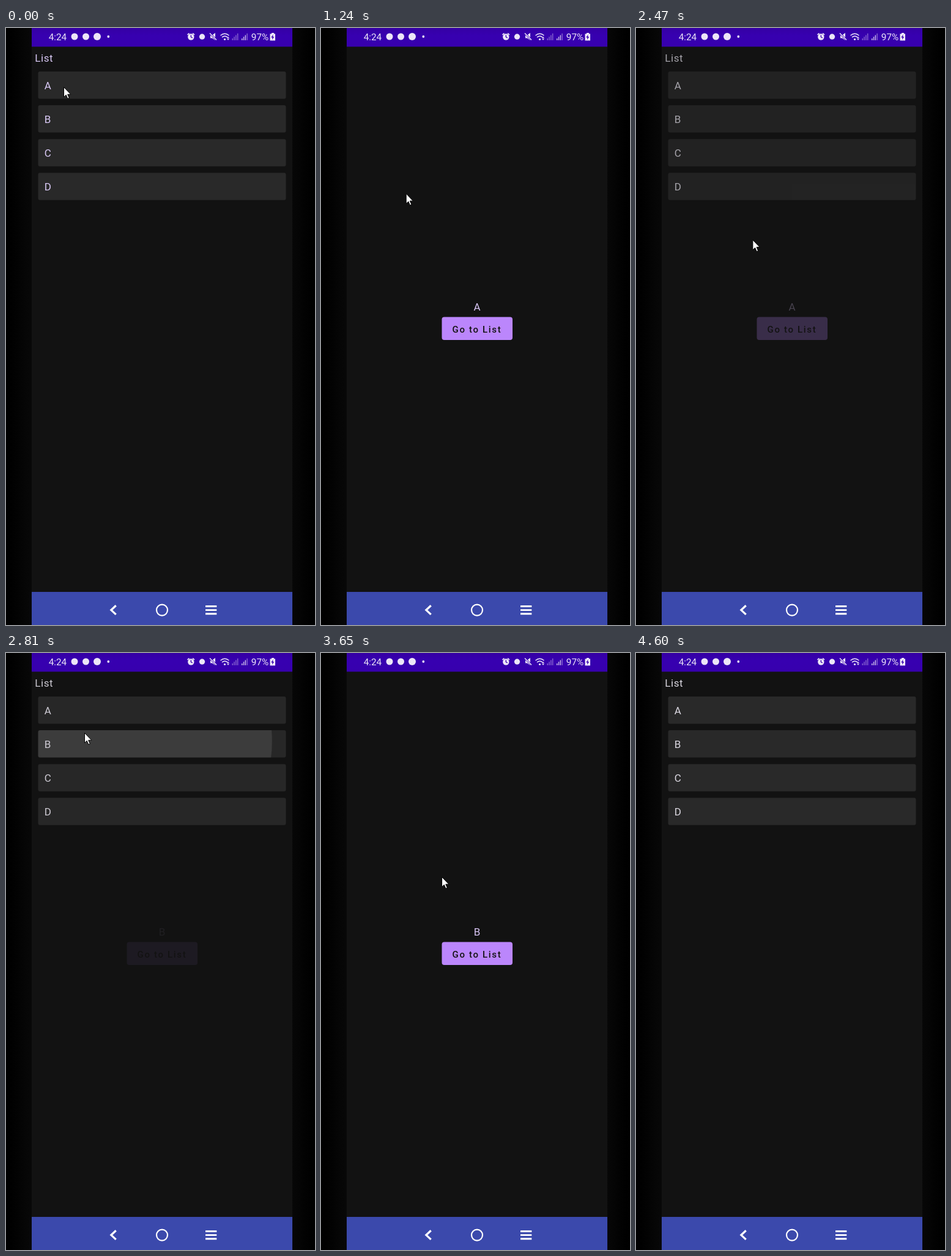
An HTML page for the animation above (4.67 s loop, 505x974 px).

```html
<!DOCTYPE html>
<html lang="en">
<head>
<meta charset="utf-8">
<title>List and detail</title>
<style>
  html, body { margin: 0; width: 100%; height: 100%; overflow: hidden; background: #000; }
  svg { display: block; width: 505px; height: 974px; }
  text { font: 400 17px Roboto, sans-serif; letter-spacing: .53px; }
  .status text { font-size: 15.3px; letter-spacing: 0; fill: #ece6f7; }
  .button { font-weight: 500; font-size: 15px; letter-spacing: 1.67px; fill: #121212; }
  .line { fill: none; stroke: #f0ebfa; }
</style>
</head>
<body>
<svg viewBox="0 0 505 974">
  <defs>
    <linearGradient id="side">
      <stop offset="0" stop-color="#000"/>
      <stop offset=".25" stop-color="#010101"/>
      <stop offset="1" stop-color="#080808"/>
    </linearGradient>
    <linearGradient id="bar" x2="0" y2="1">
      <stop offset="0" stop-color="#3500a4"/>
      <stop offset=".4" stop-color="#3700b0"/>
      <stop offset="1" stop-color="#3700ae"/>
    </linearGradient>
    <clipPath id="rowClip"><rect id="rowBox" x="52.5" width="405" height="44.5" rx="3"/></clipPath>
    <clipPath id="buttonClip"><rect x="197.5" y="471.5" width="115.5" height="37.5" rx="4"/></clipPath>
  </defs>

  <rect width="42" height="974" fill="url(#side)"/>
  <rect width="42" height="974" fill="url(#side)" transform="matrix(-1 0 0 1 505 0)"/>
  <rect x="42" width="426" height="974" fill="#121212"/>

  <g id="list">
    <text x="47.3" y="55">List</text>
    <g id="rows"></g>
    <g clip-path="url(#rowClip)"><circle id="rowRipple" fill="#fff"/></g>
    <g id="labels"></g>
  </g>

  <g id="detail">
    <text id="letter" x="255.2" y="461" text-anchor="middle" fill="#d6c3f2"></text>
    <rect x="197.5" y="471.5" width="115.5" height="37.5" rx="4" fill="#bb86fc"/>
    <g clip-path="url(#buttonClip)"><circle id="buttonRipple" fill="#000"/></g>
    <text class="button" x="214.5" y="496.5">Go to List</text>
  </g>

  <g class="status">
    <rect x="42" width="426" height="30.5" fill="url(#bar)"/>
    <text x="69.7" y="20">4:24</text>
    <g fill="#ece6f7">
      <circle cx="112" cy="14" r="5.5"/>
      <circle cx="130.5" cy="14" r="5.5"/>
      <circle cx="149" cy="14" r="6"/>
      <circle cx="167.3" cy="14" r="1.9"/>
      <circle cx="302.3" cy="14.5" r="5.2"/>
      <circle cx="320.5" cy="14.2" r="4.6"/>
      <path d="M334 11.5h3l5-3.5v12l-5-3.5h-3z"/>
      <circle cx="357.5" cy="18.5" r="1.6"/>
      <path d="M363 14l2 2.6h-4zM363 20l2-2.6h-4z"/>
    </g>
    <path class="line" stroke-width="1.6" d="M296.5 11.2l3-2.6M308 11.2l-3-2.6"/>
    <path d="M302.3 11.5v3.2l2.4 1.4" fill="none" stroke="#3700b0" stroke-width="1.3"/>
    <path d="M333.5 9l11 11" stroke="#3700b0" stroke-width="3"/>
    <path class="line" stroke-width="1.4" d="M333 8.5l11 11"/>
    <path class="line" stroke-width="1.4" d="M350.5 12.3q7-6.2 14 0M353 15.2q4.5-4 9 0"/>
    <g id="signal"></g>
    <text x="400.8" y="20">97%</text>
    <path fill="#f0ebfa" d="M434 8h4v1.5h2v11h-8.5v-11h2.5z"/>
    <path fill="#3700b0" d="M436.6 10.5l-3.4 5h2.2l-.6 3.7 3.5-5h-2.3z"/>
  </g>

  <rect x="42" y="920" width="426" height="54" fill="#3b49ac"/>
  <g fill="none" stroke="#fff">
    <path d="M179.7 942.3l-7.8 7.3 7.8 7.3" stroke-width="3.3"/>
    <circle cx="255" cy="949.6" r="9" stroke-width="2.2"/>
    <path d="M326 943.5h18.3M326 949.6h18.3M326 955.7h18.3" stroke-width="2.9"/>
  </g>

  <path id="cursor" fill="#fff" stroke="#000" stroke-width="1"
    d="M0 0V16.2L3.7 12.7 6.3 18.8 8.8 17.7 6.2 11.8H11.3Z"/>
</svg>

<script>
const LOOP = 4670;
const $ = id => document.getElementById(id);
const set = (el, attrs) => {
  for (const key in attrs) el.setAttribute(key, attrs[key]);
};
const make = (parent, tag, attrs, text = '') => {
  const el = document.createElementNS('http://www.w3.org/2000/svg', tag);
  set(el, attrs);
  el.textContent = text;
  parent.append(el);
};
const clamp = v => Math.min(1, Math.max(0, v));
const mix = (a, b, p) => a + (b - a) * p;

// cubic-bezier(.4, 0, .2, 1)
function ease(x) {
  let lo = 0, hi = 1, u = .5;
  for (let i = 0; i < 18; i++) {
    u = (lo + hi) / 2;
    const bx = 1.2 * u * (1 - u) ** 2 + .6 * u * u * (1 - u) + u ** 3;
    if (bx < x) lo = u; else hi = u;
  }
  return u * u * (3 - 2 * u);
}

const rowY = i => 71 + 55.1 * i;
[...'ABCD'].forEach((name, i) => {
  make($('rows'), 'rect', { x: 52.5, y: rowY(i), width: 405, height: 44.5, rx: 3, fill: '#292929' });
  make($('labels'), 'text', { x: 62.7, y: rowY(i) + 29 }, name);
});
for (const x of [369.5, 385]) {
  for (let i = 0; i < 4; i++) {
    make($('signal'), 'rect', {
      x: x + i * 2.8, y: 17 - i * 2.7, width: 1.5, height: 3 + i * 2.7,
      fill: '#e0d8f2', opacity: x > 380 && i < 3 ? .85 : .45
    });
  }
}

// Bursts of movement: first step, last step, number of steps
const bursts = [
  [70, 270, 3], [470, 960, 8], [1030, 1520, 8], [1590, 2000, 7],
  [2270, 2740, 7], [2810, 3300, 8], [3370, 3920, 9], [4220, 4600, 7]
];
function stepTime(t) {
  let shown = 0;
  for (const [from, to, count] of bursts) {
    if (t < from) break;
    const gap = (to - from) / (count - 1);
    shown = Math.min(to, from + Math.floor((t - from) / gap + 1e-3) * gap);
  }
  return shown;
}

// Crossfades: start, detail opacity reached
const fades = [[500, 1], [2285, 0], [2765, 1], [4280, 0]];
// Cursor: time, x, y
const path = [
  [0, 94.5, 96.5], [270, 95.5, 93.5], [980, 95.5, 93.5], [1520, 188, 468],
  [2000, 234.5, 496.5], [2290, 234.5, 496.5], [2600, 128.5, 130.5], [3310, 128.5, 130.5],
  [3850, 230.5, 477.5], [4310, 230.5, 477.5], [4590, 47, 5]
];
const rowTaps = [{ at: 402, row: 0 }, { at: 2640, row: 1 }];
const buttonTaps = [{ at: 2220 }, { at: 4215 }];

function cursorAt(t) {
  const next = path.findIndex(p => p[0] > t);
  if (next < 0) return path[path.length - 1].slice(1);
  const [t0, x0, y0] = path[next - 1], [t1, x1, y1] = path[next];
  const p = (t - t0) / (t1 - t0), s = p * p * (3 - 2 * p);
  return [mix(x0, x1, s), mix(y0, y1, s)];
}

function ripple(el, taps, t, box) {
  const tap = taps.find(r => t >= r.at && t < r.at + 375);
  if (!tap) return set(el, { opacity: 0 });
  const { x, y, w, h } = box(tap);
  const age = t - tap.at, p = clamp(age / 225);
  const [px, py] = cursorAt(tap.at);
  set(el, {
    cx: mix(px, x + w / 2, p),
    cy: mix(py, y + h / 2, p),
    r: mix(.3 * w, Math.hypot(w, h) / 2 + 10.6, ease(p)),
    opacity: .1 * clamp(age / 75) * clamp((375 - age) / 150)
  });
}

function rowBox(tap) {
  const y = rowY(tap.row);
  set($('rowBox'), { y });
  return { x: 52.5, y, w: 405, h: 44.5 };
}
const buttonBox = () => ({ x: 197.5, y: 471.5, w: 115.5, h: 37.5 });

function draw(t) {
  let shown = 0;
  for (const [start, to] of fades) {
    if (t >= start) shown = mix(1 - to, to, ease(clamp((t - start) / 300)));
  }
  set($('list'), { opacity: 1 - shown, fill: t < 500 ? '#d9c9f5' : '#dad7e0' });
  set($('detail'), { opacity: shown });
  $('letter').textContent = t < 2700 ? 'A' : 'B';
  ripple($('rowRipple'), rowTaps, t, rowBox);
  ripple($('buttonRipple'), buttonTaps, t, buttonBox);
  set($('cursor'), {
    transform: `translate(${cursorAt(t)})`,
    visibility: t < 4595 ? 'visible' : 'hidden'
  });
}

const begin = performance.now();
function tick() {
  draw(stepTime((performance.now() - begin) % LOOP));
  requestAnimationFrame(tick);
}
tick();
</script>
</body>
</html>
```
